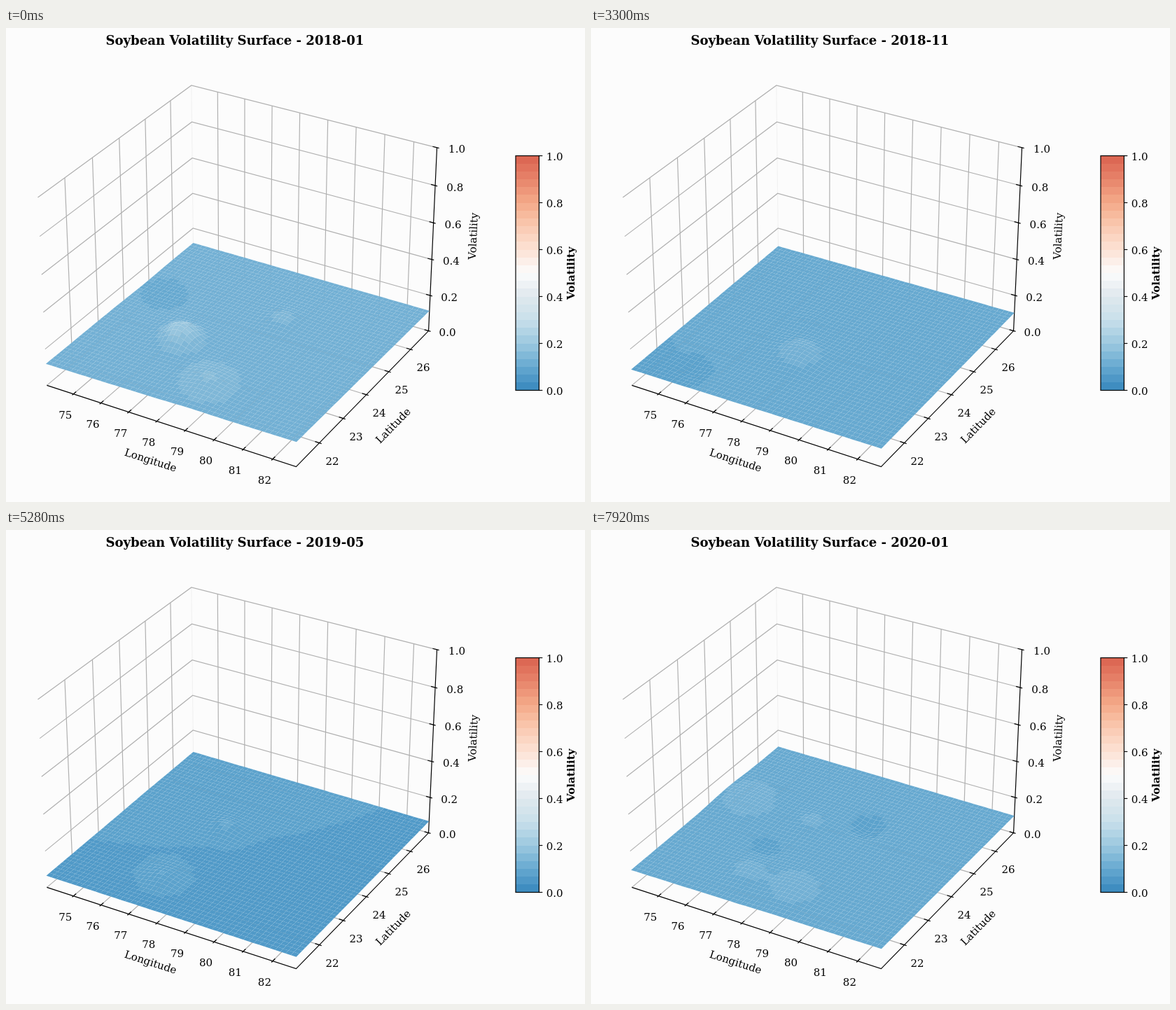
Animation, 827 px wide and 677 px high, one loop 8000 ms. Source, as an HTML page with a canvas:

```html
<!DOCTYPE html>
<html lang="en">
<head>
<meta charset="utf-8">
<title>Volatility surface</title>
<style>
  html, body { margin: 0; width: 100%; height: 100%; overflow: hidden; background: #fcfcfc; }
  canvas { display: block; }
</style>
</head>
<body>
<canvas id="stage" width="827" height="677"></canvas>
<script>
const ctx = document.getElementById('stage').getContext('2d');
const LOOP = 8000, STEP = 330, CELLS = 49, TONE = 0.0225, BANDS = 30;
const FAMILY = '"DejaVu Serif", "Noto Serif", serif';

const range = (from, to) => Array.from({ length: to - from + 1 }, (_, i) => from + i);
const lerp = (a, b, t) => a + (b - a) * t;

// Perspective view: azimuth -60, elevation 30, distance 10, box 4:4:3; u, v, w run 0..1.
function project(u, v, w) {
  const x = (u - 0.5) * 1.1905, y = (v - 0.5) * 1.1905, z = (w - 0.5) * 0.8929;
  const scale = 3426 / (10 - 0.433 * x + 0.75 * y - 0.5 * z);
  return [336 + scale * (0.866 * x + 0.5 * y),
          341.2 - scale * (-0.25 * x + 0.433 * y + 0.866 * z)];
}
const lonToU = lon => (lon - 74.02) / 8.767;
const latToV = lat => 0.163 + (lat - 22) * 0.1725;
const lons = range(75, 82), lats = range(22, 26), levels = range(0, 5).map(i => i / 5);

// Colour map, one stop per 0.1.
const stops = ['3787bd', '66a9d0', '9cc8df', 'c8dfeb', 'dfe8ed', 'fcfcfc',
               'fce2d5', 'fac9b1', 'f4aa89', 'e7836a', 'da634f']
  .map(hex => hex.match(/../g).map(part => parseInt(part, 16)));
function colorAt(value) {
  const i = Math.min(9, Math.floor(value * 10));
  return `rgb(${stops[i].map((c, k) => Math.round(lerp(c, stops[i + 1][k], value * 10 - i)))})`;
}

// Measuring sites: screen position of the foot and reach of their influence.
const sites = {
  north: [226, 387, 32], crest: [363, 390, 17], centre: [315, 418, 15],
  east: [396, 422, 16], hill: [250, 450, 19], middle: [298, 467, 23],
  west: [145, 485, 14], south: [225, 488, 18], coast: [290, 512, 28]
};

// Heights of the corners (left, front, right, back) and rise at each active site.
const keys = [
  { month: 0, corners: [.119, .133, .114, .115], rise: { hill: .083, coast: .036, east: .025, north: -.008 } },
  { month: 4, corners: [.069, .083, .075, .073], rise: { middle: .022, hill: .018, centre: .014 } },
  { month: 8, corners: [.08, .086, .096, .096], rise: { east: .025, centre: .021, hill: .01, middle: -.01, west: -.013 } },
  { month: 12, corners: [.096, .109, .109, .096], rise: { middle: .088, west: -.018, east: -.022 } },
  { month: 16, corners: [.065, .064, .066, .074], rise: { centre: .028, south: .026, north: .003 } },
  { month: 21, corners: [.099, .107, .117, .12], rise: { crest: -.013, east: .025, hill: .018, west: -.015, coast: -.021 } },
  { month: 24, corners: [.096, .107, .097, .105], rise: { north: .022, centre: .018, east: -.035, hill: -.02, south: .022, coast: .023 } }
];

function line(color, ...points) {
  ctx.strokeStyle = color;
  ctx.lineWidth = 1.2;
  ctx.beginPath();
  points.forEach(p => ctx.lineTo(...p));
  ctx.stroke();
}

function text(string, x, y, { size = 15, weight = '', angle = 0, align = 'center', drop = 5.5 } = {}) {
  ctx.save();
  ctx.translate(x, y);
  ctx.rotate(angle * Math.PI / 180);
  ctx.font = `${weight} ${size}px ${FAMILY}`;
  ctx.textAlign = align;
  ctx.fillStyle = '#000';
  ctx.fillText(string, 0, drop);
  ctx.restore();
}

function drawGrid() {
  const gray = '#b0b0b0';
  line('#f2f2f2', project(0, 1, 0), project(0, 1, 1));
  lons.map(lonToU).forEach(u => line(gray, project(u, 0, 0), project(u, 1, 0), project(u, 1, 1)));
  lats.map(latToV).forEach(v => line(gray, project(1, v, 0), project(0, v, 0), project(0, v, 1)));
  levels.forEach(w => line(gray, project(0, 0, w), project(0, 1, w), project(1, 1, w)));
}

function drawAxes() {
  const black = '#000', inner = 0.0167, outer = 0.0083;
  line(black, project(0, 0, 0), project(1, 0, 0), project(1, 1, 0), project(1, 1, 1));
  lons.forEach(lon => {
    const u = lonToU(lon), [x, y] = project(u, 0, 0);
    line(black, project(u, inner, 0), project(u, -outer, 0));
    text(lon, x - 11.5, y + 29.5);
  });
  lats.forEach(lat => {
    const v = latToV(lat), [x, y] = project(1, v, 0);
    line(black, project(1 - inner, v, 0), project(1 + outer, v, 0));
    text(lat, x + 18.3, y + 25.5);
  });
  levels.forEach(w => {
    const [x, y] = project(1, 1, w);
    line(black, project(1 - inner, 1, w), project(1 + outer, 1, w));
    text(w.toFixed(1), x + 27 + w * 1.5, y + 2);
  });
  text('Longitude', 206.3, 618.3, { angle: 18, drop: 4 });
  text('Latitude', 553.3, 568.3, { angle: -45.6, drop: 4.5 });
  text('Volatility', 668.3, 297.3, { angle: -87.4, drop: 4 });
}

function drawColorBar() {
  const left = 728, bottom = 517.5, width = 33.4, height = 335;
  range(0, BANDS - 1).forEach(i => {
    const top = Math.round(bottom - height * (i + 1) / BANDS);
    ctx.fillStyle = colorAt((i + 0.5) / BANDS);
    ctx.fillRect(left, top, width, Math.round(bottom - height * i / BANDS) - top);
  });
  ctx.strokeStyle = '#000';
  ctx.lineWidth = 1.2;
  ctx.strokeRect(left, bottom - height, width, height);
  levels.forEach(w => {
    const y = bottom - height * w;
    line('#000', [761, y], [766.3, y]);
    text(w.toFixed(1), 771.7, y + 0.5, { align: 'left' });
  });
  text('Volatility', 808.3, 350.3, { angle: -90, weight: 'bold', drop: 4 });
}

function keyHeight({ corners: [left, front, right, back], rise }, u, v) {
  const [x, y] = project(u, v, 0.1);
  const plane = lerp(lerp(left, front, u), lerp(back, right, u), v);
  return Object.entries(rise).reduce((height, [name, amount]) => {
    const [sx, sy, reach] = sites[name];
    return height + amount * Math.exp(-(((x - sx) ** 2 + (1.5 * (y - sy)) ** 2) / (2 * reach ** 2)));
  }, plane);
}

function drawSurface(month) {
  const next = Math.max(1, keys.findIndex(key => key.month >= month));
  const a = keys[next - 1], b = keys[next];
  const mix = (month - a.month) / (b.month - a.month);
  const nodes = range(0, CELLS).map(i => range(0, CELLS).map(j => {
    const u = i / CELLS, v = j / CELLS;
    return lerp(keyHeight(a, u, v), keyHeight(b, u, v), mix);
  }));

  // Far cells first.
  for (let j = CELLS - 1; j >= 0; j--) {
    for (let i = 0; i < CELLS; i++) {
      const corners = [[i, j], [i + 1, j], [i + 1, j + 1], [i, j + 1]];
      const mean = corners.reduce((sum, [p, q]) => sum + nodes[p][q] / 4, 0);
      ctx.fillStyle = colorAt((Math.floor(mean / TONE) + 0.5) * TONE);
      ctx.beginPath();
      corners.forEach(([p, q]) => ctx.lineTo(...project(p / CELLS, q / CELLS, nodes[p][q])));
      ctx.fill();
    }
  }
}

function draw(month) {
  ctx.fillStyle = '#fcfcfc';
  ctx.fillRect(0, 0, 827, 677);
  drawGrid();
  drawAxes();
  drawSurface(month);
  drawColorBar();
  const date = `${2018 + Math.floor(month / 12)}-${String(month % 12 + 1).padStart(2, '0')}`;
  text(`Soybean Volatility Surface - ${date}`, 326.9, 18, { size: 18.08, weight: 'bold', drop: 6 });
}

let shown = -1;
function tick() {
  const month = Math.floor(performance.now() % LOOP / STEP);
  if (month !== shown) draw(shown = month);
  requestAnimationFrame(tick);
}
tick();
</script>
</body>
</html>
```
